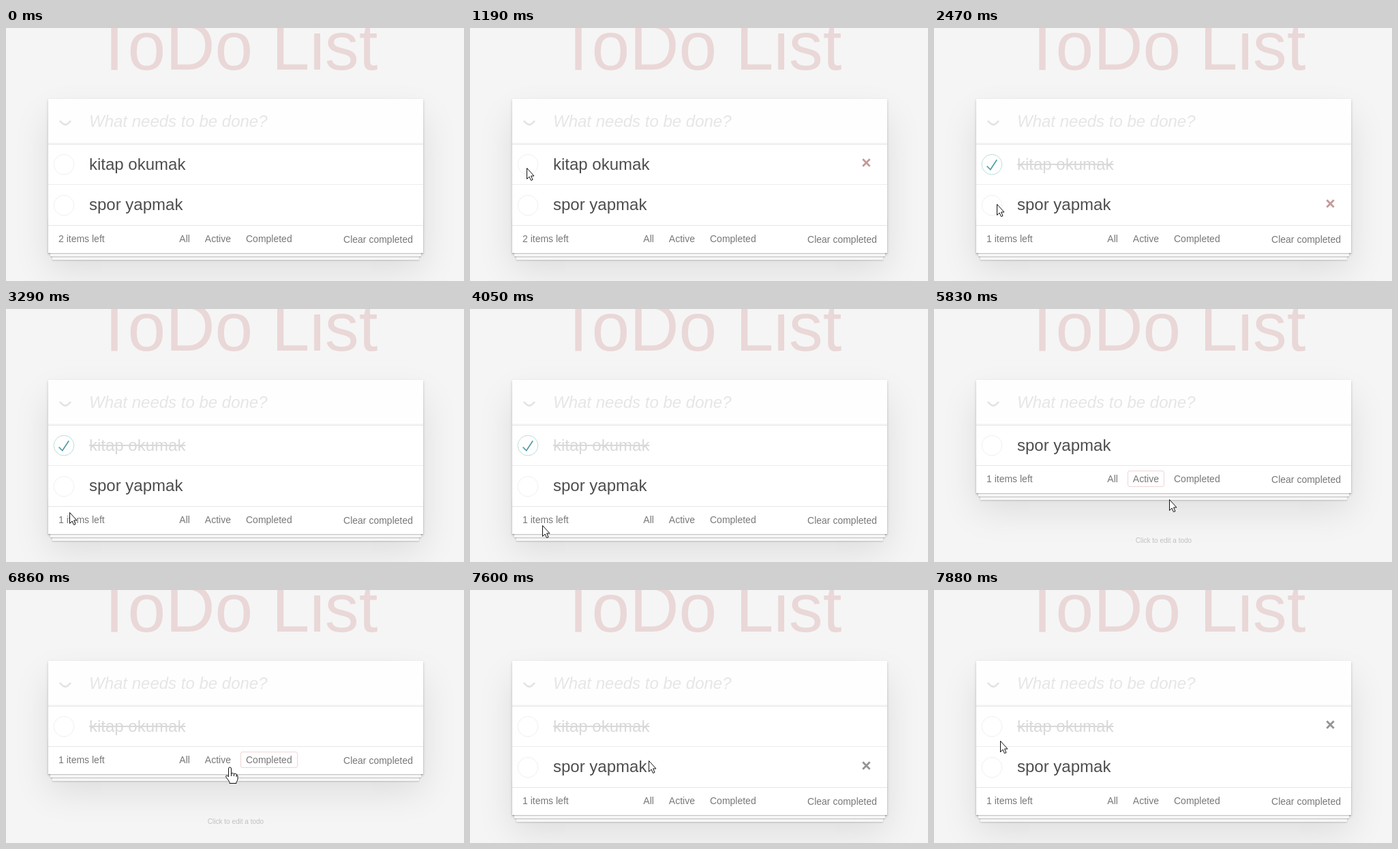
These frames come from a looping animation (672x371 px, 8000 ms). An HTML page:

```html
<!DOCTYPE html>
<html lang="en">
<head>
<meta charset="utf-8">
<title>ToDo List</title>
<style>
  html, body { margin: 0; width: 100%; height: 100%; overflow: hidden; }
  body { position: relative; background: #f5f5f5; color: #4d4d4d; font: 14px/1.4em "Liberation Sans", Arial, sans-serif; }
  [hidden] { display: none !important; }
  h1 { position: absolute; left: 62px; top: -24px; width: 550px; margin: 0; text-align: center; white-space: nowrap;
       font: 100px/100px "Liberation Sans", Arial, sans-serif; color: rgba(175, 47, 47, .15); text-rendering: optimizeLegibility; }
  main { position: absolute; left: 62px; top: 104px; width: 550px; background: #fff;
         box-shadow: 0 2px 4px rgba(0, 0, 0, .2), 0 25px 50px rgba(0, 0, 0, .1); }
  .entry { padding: 16px 16px 16px 60px; font-size: 24px; line-height: 33.6px; font-style: italic; color: #e6e6e6;
           background: rgba(0, 0, 0, .003); box-shadow: inset 0 -2px 1px rgba(0, 0, 0, .03); }
  .rows { border-top: 1px solid #e6e6e6; }
  .row { position: relative; padding: 15px 15px 15px 60px; font-size: 24px; line-height: 28.8px; }
  .row:not([hidden]) + .row { border-top: 1px solid #ededed; }
  .row svg { position: absolute; left: 0; top: 9.4px; }
  .row .remove { left: 513px; top: 20.4px; }
  footer { position: relative; height: 20px; padding: 10px 15px; border-top: 1px solid #e6e6e6; color: #777; }
  footer::before { content: ""; position: absolute; left: 0; right: 0; bottom: 0; height: 50px;
    box-shadow: 0 1px 1px rgba(0, 0, 0, .2), 0 8px 0 -3px #f6f6f6, 0 9px 1px -3px rgba(0, 0, 0, .2),
                0 16px 0 -6px #f6f6f6, 0 17px 2px -6px rgba(0, 0, 0, .2); }
  .filters { position: absolute; left: 0; right: 0; top: 10px; text-align: center; }
  .filters span { margin: 3px; padding: 3px 7px; border: 1px solid transparent; border-radius: 3px; }
  .clear { position: absolute; right: 15px; top: 10px; line-height: 20px; }
  .hint { position: absolute; left: 0; right: 0; top: 100%; margin: 65px 0 0; text-align: center; font-size: 10px; line-height: 1;
          color: #bfbfbf; text-shadow: 0 1px 0 rgba(255, 255, 255, .5); }
  .overlay { position: absolute; left: 0; top: 0; }
</style>
</head>
<body>
<h1>ToDo List</h1>
<main>
  <div class="entry">What needs to be done?</div>
  <div class="rows"></div>
  <footer>
    <span id="count"></span>
    <div class="filters"><span>All</span><span>Active</span><span>Completed</span></div>
    <span class="clear">Clear completed</span>
  </footer>
  <p class="hint">Click to edit a todo</p>
</main>
<svg class="overlay" width="672" height="371" fill="none">
  <path d="M79 136q4 5 8 6q4-1 8-6" stroke="#e3e3e3" stroke-width="2.8"/>
  <g id="cursor" stroke="#111" stroke-linejoin="round">
    <circle id="glow" cx="1" r="12" fill="rgba(255,255,0,.6)" stroke="none"/>
    <path id="arrow" d="M.5.5v16L4 13l2.5 5.5 2.5-1L6.6 12H11z" fill="#fff"/>
    <path id="hand" d="M-1.5 14V2a2 2 0 0 1 4 0v7q4-1 4 .5 4-1 3.5 1.5 2 0 2 2v4q0 2.500-2 4.500v2H0v-2l-5-7q-1-2 .5-2.600 1.500-.4 3 2.100zM2.500 9v4M6.500 9.500V13M10 11v3" fill="#fff"/>
  </g>
</svg>
<script>
const LOOP = 8000, STEP = 70, TRAVEL = 420;
const CHECKED = 2050, ACTIVE = 5220, COMPLETED = 6720, ALL = 7540;
const CHANGES = [CHECKED, ACTIVE, COMPLETED, ALL];

// Pointer stops: arrival time, x, y
const STOPS = [
  [640, 44, 163], [710, 114, 192], [1190, 83, 205], [2470, 92, 258], [2820, 97, 290],
  [3570, 86, 313], [4050, 106, 317], [4390, 269, 317], [4810, 301, 313], [6030, 388, 245],
  [COMPLETED, 387, 245], [6860, 328, 260], [7340, 262, 250], [ALL, 262, 250], [7880, 97, 221]
];

const $ = id => document.getElementById(id);
const show = (el, on) => el.toggleAttribute("hidden", !on);
const between = (v, a, b) => v >= a && v < b;
const clamp = v => Math.min(1, Math.max(0, v));

function contains(el, x, y) {
  const r = el.getBoundingClientRect();
  return between(x, r.left, r.right) && between(y, r.top, r.bottom);
}

const rows = ["kitap okumak", "spor yapmak"].map(text => {
  const el = document.createElement("div");
  el.className = "row";
  el.innerHTML = `<svg width="40" height="40" viewBox="-10 -18 100 135" overflow="visible">
      <circle cx="50" cy="50" r="50" fill="none" stroke-width="3"/>
      <path d="M72 25L42 71 27 56l-4 4 20 20 34-52z" fill="#52a0a6"/></svg>
    <span>${text}</span>
    <svg class="remove" width="13" height="13"><path d="M1.3 1.3l10.4 10.4m0-10.4L1.3 11.7" stroke-width="2.8"/></svg>`;
  document.querySelector(".rows").append(el);
  const find = s => el.querySelector(s);
  return { el, ring: find("circle"), tick: find("path"), label: find("span"), remove: find(".remove") };
});
const links = [...document.querySelectorAll(".filters span")];

// Wait at each stop, then travel so as to arrive at the next one on time
function pointerAt(t) {
  const next = STOPS.findIndex(stop => stop[0] > t);
  if (next === 0) return [-99, -99];
  const [t0, x0, y0] = STOPS.at(next < 0 ? -1 : next - 1);
  const [t1, x1, y1] = STOPS.at(next);
  const span = Math.min(TRAVEL, t1 - t0);
  const k = next < 0 ? 0 : clamp(Math.floor((t - t1 + span) / STEP) * STEP / span);
  return [Math.round(x0 + (x1 - x0) * k), Math.round(y0 + (y1 - y0) * k)];
}

function render(t) {
  const [x, y] = pointerAt(t);
  const filter = between(t, ACTIVE, COMPLETED) ? 1 : between(t, COMPLETED, ALL) ? 2 : 0;
  const done = t >= CHECKED;

  rows.forEach((row, i) => show(row.el, !filter || filter === 2 - i));
  rows.forEach((row, i) => {
    const ticked = i === 0 && between(t, CHECKED, ACTIVE);
    show(row.tick, ticked);
    row.ring.style.stroke = ticked ? "#b5d9d4" : "#ededed";
    show(row.remove, contains(row.el, x, y) || (i === 1 && between(t, 370, 440)));
    row.remove.style.stroke = t >= ALL ? "#949494" : "#c49a9a";
  });

  const shade = 77 + 140 * clamp((t - CHECKED) / 400);
  rows[0].label.style.color = `rgb(${shade},${shade},${shade})`;
  rows[0].label.style.textDecoration = done ? "line-through" : "none";
  $("count").textContent = `${done ? 1 : 2} items left`;

  // The outline needs the pointer a little further inside than the hand does
  links.forEach((link, i) => {
    const alpha = filter && filter === i ? .2 : contains(link, x, y + 3) ? .1 : 0;
    link.style.borderColor = `rgba(175,47,47,${alpha})`;
  });

  const overLink = links.some(link => contains(link, x, y));
  $("cursor").setAttribute("transform", `translate(${x} ${y})`);
  show($("arrow"), !overLink);
  show($("hand"), overLink);
  show($("glow"), CHANGES.some(c => between(t, c - STEP, c)));
}

const start = performance.now();
(function frame() {
  render((performance.now() - start) % LOOP);
  requestAnimationFrame(frame);
})();
</script>
</body>
</html>
```
